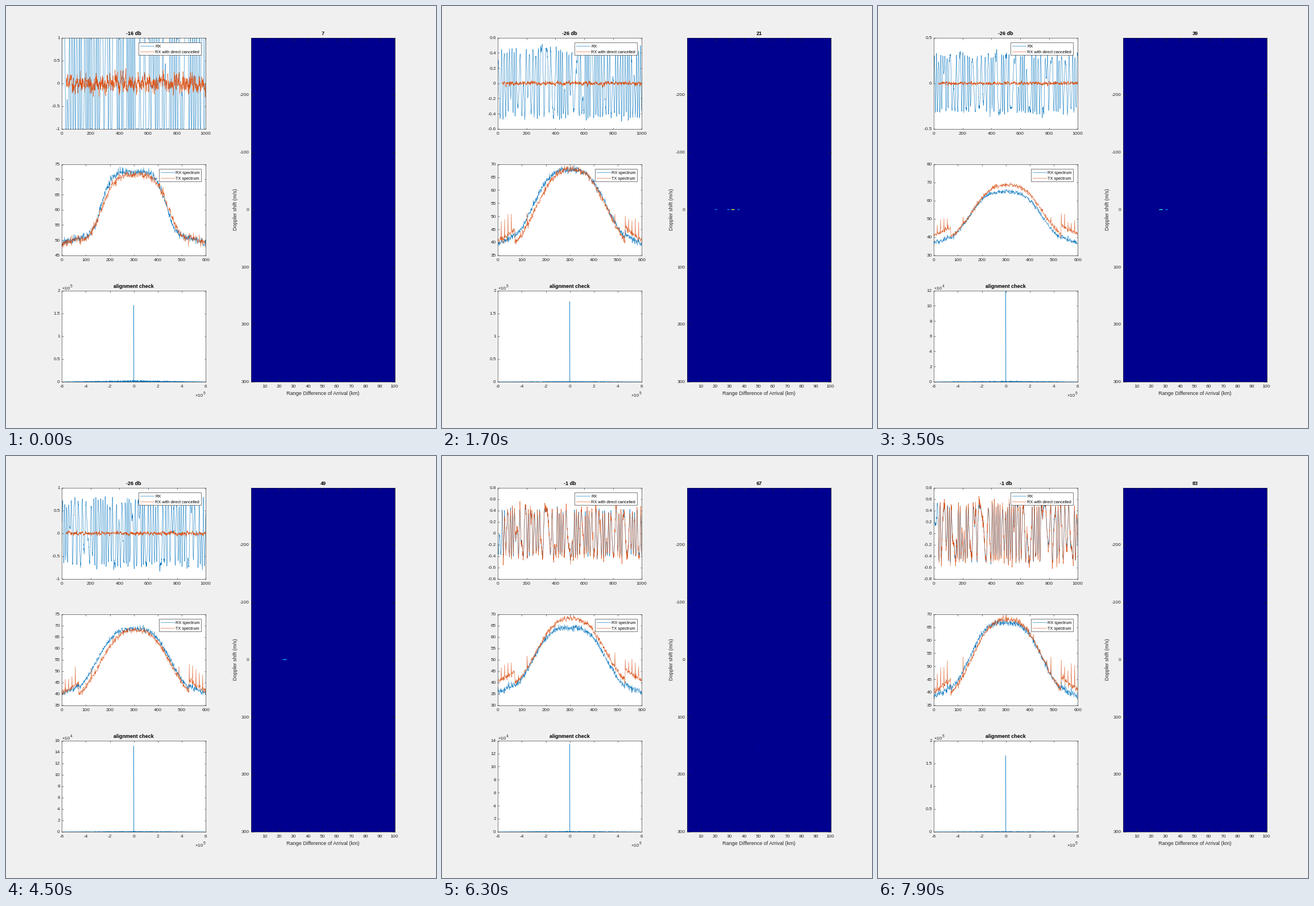
Animation of 756 by 741 pixels, one loop 8000 ms. Source, as a matplotlib script:

```python
import numpy as np
import matplotlib.pyplot as plt
from matplotlib.animation import FuncAnimation
from matplotlib.collections import LineCollection
from matplotlib.lines import Line2D
from matplotlib.patches import Rectangle

W, H, DPI = 756, 741, 72          # at 72 dpi one point is one pixel
FRAMES, INTERVAL = 80, 100
BLUE, RED, INK = "#0072BD", "#D95319", "#262626"
BASE, BIG, SMALL, THIN = 8.2, 9.0, 7.4, 0.6

plt.rcParams.update({"font.family": "Liberation Sans", "font.size": BASE,
                     "axes.unicode_minus": False})

# Levels drift between a few key steps.
STEPS = [0, 7, 16, 21, 25, 30, 38]
AMPLITUDE = [1.8, .44, .31, .70, .72, .39, .47]
RX_TOP = [72.5, 67.8, 65, 68.5, 67.7, 64, 66.8]
TX_TOP = [71.5, 68, 68.6, 68, 68.6, 68, 68]
PEAK = [1.68, 1.76, 1.199, 1.51, 1.515, 1.35, 1.67]

SAMPLES = np.arange(1000)
BINS = np.arange(600)
LAG = np.linspace(-5.9, 5.9, 1201)
SPURS = [*range(14, 71, 14), 122, 488, *range(531, 600, 14)]


def level(k, values):
    return np.interp(k, STEPS, values)


def cancel_db(k):
    return np.interp(k, [0, 7, 21, 25, 30], [-16, -26, -26, -5, -1])


def wideness(k):
    return max(0, 1 - k / 4)


def smooth(rng, n, width):
    y = np.convolve(rng.normal(size=n + 2 * width), np.hanning(width), "same")
    y = y[width:-width]
    return y / y.std()


def time_signals(k, rng):
    """FM signal, what is left after cancelling, and the largest value."""
    n, amp, db = SAMPLES.size, level(k, AMPLITUDE), cancel_db(k)
    leak = np.clip((db + 6) / 5, 0, 1)
    noise = .65 * min(amp, 1) * 10 ** (db / 20) * (1 - .75 * leak)
    peak = max(min(1, 1.22 * amp), leak * amp + 4 * noise)

    freq = .08 * np.tanh(smooth(rng, n, 55))
    phase = 2 * np.pi * np.cumsum(freq) + rng.uniform(0, 6)
    envelope = 1 + .07 * smooth(rng, n, 25)
    rx = amp * (envelope * np.sin(phase) + .05 * rng.normal(size=n))
    rx = np.clip(rx, -min(1, peak), min(1, peak))
    rest = .8 * rng.normal(size=n) + .6 * smooth(rng, n, 14)
    clean = np.clip(leak * rx + noise * rest, -peak, peak)
    clean[:30] = np.nan
    return rx, clean, peak


def hump(floor, top, mid, width, power):
    d = np.abs(BINS - mid)
    dome = 5 * (1 - (d / 300) ** 2)
    return floor + dome + (top - floor - 5) * np.exp(-(d / width) ** power)


def spectra(k, rng):
    wide = wideness(k)
    rx_top, tx_top = level(k, RX_TOP), level(k, TX_TOP)
    rx_floor = rx_top - 29.5 + 5.5 * wide
    low, high = rx_floor - 1.3, max(rx_top, tx_top) + 1.7

    extra = np.where((BINS < 70) | (BINS > 530), 5.5, 0)
    extra[SPURS] += rng.uniform(4, 8, len(SPURS))
    extra *= 1 - .8 * wide
    rx = hump(rx_floor, rx_top, 300, 170 - 27 * wide, 3.2 + 1.8 * wide)
    tx = hump(tx_top - 33 + 9 * wide, tx_top, 306, 172 - 22 * wide,
              2.7 + 1.3 * wide)
    rx, tx = (np.clip(y + .65 * rng.normal(size=y.size), low, high)
              for y in (rx + .2 * extra, tx + extra))
    return rx, tx, low, high


def correlation(k, rng):
    floor = .011 + .023 * wideness(k)
    y = floor * (1 - np.abs(LAG) / 6.3) * rng.uniform(0, 1, LAG.size)
    y[::2] *= .1
    y[LAG.size // 2] = level(k, PEAK)
    return y


def echoes(k, rng):
    """Echoes as (range, length, Doppler, strength)."""
    if cancel_db(k) > -20:
        return [(rng.uniform(30, 60), 1.5, rng.uniform(-280, 280), .05)]
    main = np.interp(k, [7, 21], [32, 23.5])
    strength = np.interp(k, [7, 21], [.6, .3])
    sides = (4, -3, -12)[:round((strength - .3) * 10)]
    return [(main, 2.6, 0, strength)] + [(main + s, 1.6, 0, .26) for s in sides]


def make_axes(left, top, right, bottom, tick, xlim, xticks):
    ax = fig.add_axes([left / W, 1 - bottom / H,
                       (right - left) / W, (bottom - top) / H])
    ax.tick_params(direction="in", top=True, right=True, length=tick,
                   width=THIN, color=INK, labelcolor=INK)
    ax.tick_params(axis="x", pad=5.2)
    ax.tick_params(axis="y", pad=3.4)
    for spine in ax.spines.values():
        spine.set(linewidth=THIN, color=INK)
    ax.set_xlim(*xlim)
    ax.set_xticks(xticks)
    return ax


def label(x, y, text, size=BASE, color=INK, **kw):
    return fig.text(x / W, 1 - y / H, text, size=size, color=color,
                    zorder=6, **kw)


def title(x, y, text=""):
    return label(x, y, text, BIG, "black", ha="center", weight="bold")


def power(x, y, exponent):
    label(x, y, "×10")
    return label(x + 14.3, y - 4, exponent, 6.6)


def legend(left, top, names):
    fig.add_artist(Rectangle((left / W, 1 - (top + 21.5) / H), (343 - left) / W,
                             21.5 / H, facecolor="white", edgecolor=INK,
                             linewidth=THIN, zorder=4))
    for i, (name, color) in enumerate(zip(names, (BLUE, RED))):
        y = top + 6 + 10.2 * i
        fig.add_artist(Line2D([(left + 2.5) / W, (left + 26.5) / W],
                              [1 - y / H] * 2, color=color, linewidth=THIN,
                              zorder=5))
        label(left + 28.7, y + 2.7, name, SMALL, "black")


def traces(ax, x, *colors):
    return [ax.plot(x, 0 * x, color=c, linewidth=.55)[0] for c in colors]


fig = plt.figure(figsize=(W / DPI, H / DPI), dpi=DPI, facecolor="#f0f0f0")

# Edges lie just inside a pixel so that frames snap to the right one.
time_ax, spec_ax, corr_ax = (
    make_axes(98.25, top, 351.25, top + 160, 2.5, xlim, xticks)
    for top, xlim, xticks in [(55.75, (0, 1000), range(0, 1001, 200)),
                              (277.75, (0, 600), range(0, 601, 100)),
                              (499.75, (-6, 6), range(-6, 7, 2))])
map_ax = make_axes(431.25, 55.75, 684, 659.75, 6, (.5, 100.5),
                   range(10, 101, 10))
map_ax.set_facecolor((0, 0, .5625))
map_ax.set_ylim(300, -299.5)
map_ax.set_yticks(range(-200, 301, 100))

rx_line, clean_line = traces(time_ax, SAMPLES, BLUE, RED)
rx_spec, tx_spec = traces(spec_ax, BINS, BLUE, RED)
corr_line, = traces(corr_ax, LAG, BLUE)
corr_line.set(zorder=3, linewidth=.45)
blips = map_ax.add_collection(LineCollection([], linewidths=1.4))

db_title = title(224.8, 51.4)
count_title = title(557.5, 51.4)
title(224.8, 495.4, "alignment check")
label(557.3, 683.2, "Range Difference of Arrival (km)", BIG, ha="center")
label(403.5, 357, "Doppler shift (m/s)", BIG, ha="center", va="center",
      rotation=90)
y_power = power(98.8, 498, "5")
power(332.5, 685.5, "5")
legend(233.2, 64.2, ["RX", "RX with direct cancelled"])
legend(269.2, 286.2, ["RX spectrum", "TX spectrum"])


def set_y(ax, lo, hi, step):
    ticks = np.arange(round(lo / step), round(hi / step) + 1) * step
    ax.set_ylim(lo, hi)
    ax.set_yticks(ticks, [f"{t:.4g}" for t in ticks])


def scale_time(peak):
    lim = next(v for v in (.5, .6, .8, 1, 1.5) if peak <= v)
    set_y(time_ax, -lim, lim, .2 if lim in (.6, .8) else .5)


def scale_spectrum(low, high):
    for step in (5, 10):
        lo, hi = np.floor(low / step) * step, np.ceil(high / step) * step
        if hi - lo <= 8 * step:
            break
    set_y(spec_ax, lo, hi, step)


def scale_correlation(peak):
    """Set the axis and return the factor from 1e5 to its unit."""
    if peak > 1.6:
        set_y(corr_ax, 0, 2, .5)
        y_power.set_text("5")
        return 1
    set_y(corr_ax, 0, 2 * np.ceil(peak * 5), 2)
    y_power.set_text("4")
    return 10


def draw(i):
    k = max(0, (i - 3) // 2)
    rng = np.random.default_rng(100 + k)

    rx, clean, peak = time_signals(k, rng)
    rx_line.set_ydata(rx)
    clean_line.set_ydata(clean)
    scale_time(peak)

    rx_db, tx_db, low, high = spectra(k, rng)
    rx_spec.set_ydata(rx_db)
    tx_spec.set_ydata(tx_db)
    scale_spectrum(low, high)

    corr = correlation(k, rng)
    corr_line.set_ydata(corr * scale_correlation(corr.max()))

    found = echoes(k, rng)
    blips.set_segments([[(x - n / 2, y), (x + n / 2, y)]
                        for x, n, y, _ in found])
    blips.set_color([plt.cm.jet(e[3]) for e in found])

    db_title.set_text(f"{round(cancel_db(k))} db")
    count_title.set_text(str(7 + 2 * k))
    return []


anim = FuncAnimation(fig, draw, frames=FRAMES, interval=INTERVAL, repeat=True,
                     init_func=lambda: draw(0), cache_frame_data=False)
plt.show()
```
